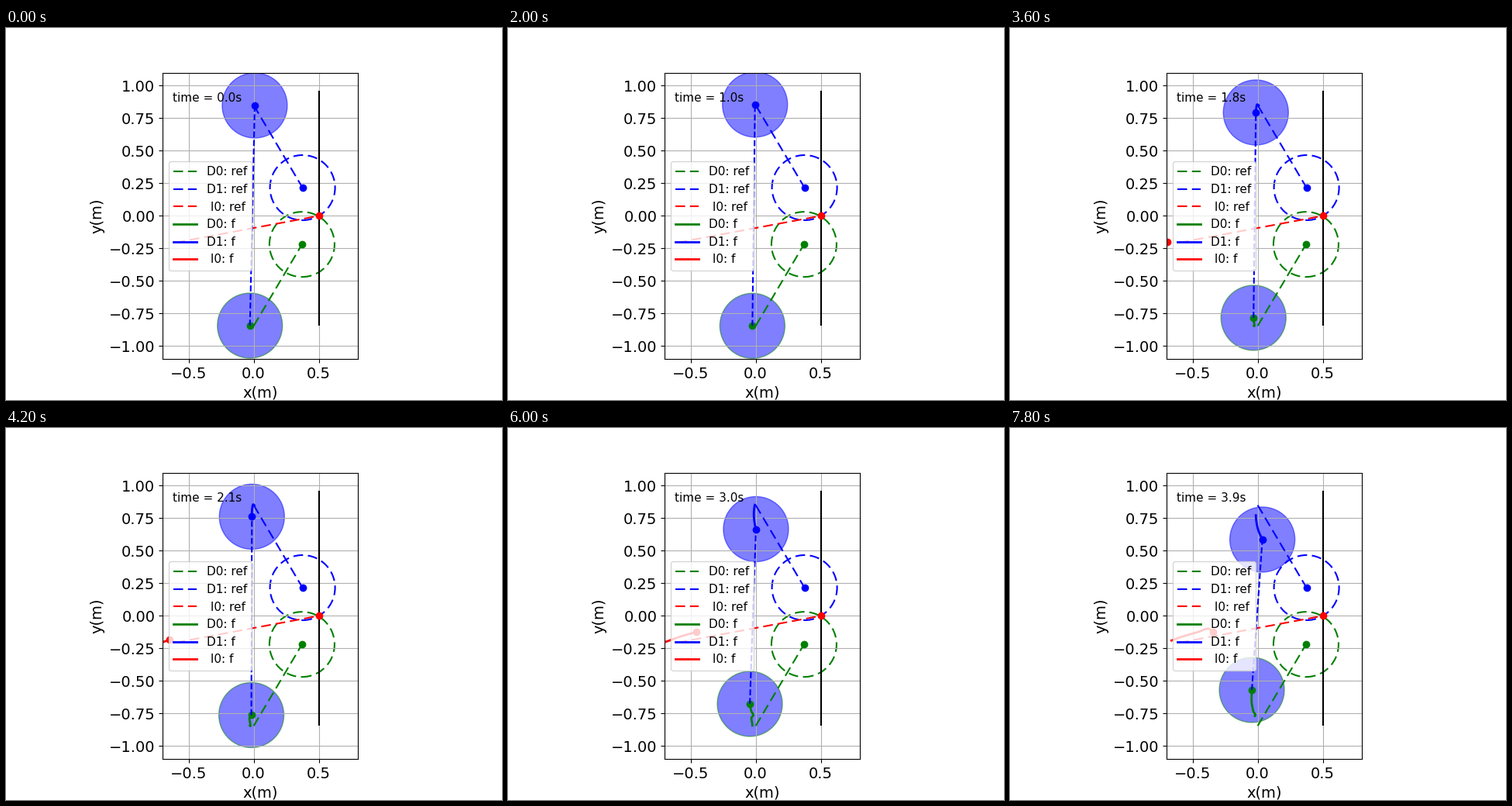
Animation, 640 px wide and 480 px high, one loop 8 s. Source, as a matplotlib script:

```python
import numpy as np
import matplotlib.pyplot as plt
from matplotlib.animation import FuncAnimation
from matplotlib.patches import Circle

FRAMES, STEP_MS, DT = 40, 200, 0.1
RADIUS = 0.25
TRAIL = 20  # points kept in each trail
DASH = (0, (6, 3))


def spline(times, values, t):
    """Cubic Hermite curve through a few key values."""
    times, values = np.array(times), np.array(values)
    slopes = np.gradient(values, times)
    k = np.clip(np.searchsorted(times, t, side="right") - 1, 0, len(times) - 2)
    h = times[k + 1] - times[k]
    u = (t - times[k]) / h
    return ((1 + 2 * u) * (1 - u) ** 2 * values[k] + u * (1 - u) ** 2 * h * slopes[k]
            + u ** 2 * (3 - 2 * u) * values[k + 1] - u ** 2 * (1 - u) * h * slopes[k + 1])


def path(*keys):
    """Positions in every frame from (time, x, y) keys."""
    t, x, y = zip(*keys)
    now = np.arange(FRAMES) * DT
    return np.column_stack([spline(t, x, now), spline(t, y, now)])


paths = [
    path((0, -.029, -.843), (1.4, -.027, -.825), (1.8, -.032, -.783),
         (2.1, -.018, -.762), (2.5, -.032, -.736), (3, -.045, -.676),
         (3.9, -.045, -.569)),
    path((0, .008, .848), (1.4, -.01, .836), (1.8, -.014, .794),
         (3, .002, .666), (3.9, .036, .586)),
    path((0, -.98, -.24), (1.8, -.694, -.2), (2.5, -.575, -.158),
         (3, -.456, -.123), (3.4, -.385, -.098), (3.9, -.343, -.123)),
]
colors = ["g", "b", "r"]
names = ["D0", "D1", " I0"]
starts = [(0, -.845), (0, .85), (-.6, -.205)]
goals = [(.371, -.219), (.375, .2165), (.5, 0)]

plt.rcParams.update({"font.family": "DejaVu Sans", "font.size": 14})
fig, ax = plt.subplots(figsize=(6.4, 4.8), dpi=100)
ax.set(xlim=(-.7, .8), ylim=(-1.1, 1.1), xlabel="x(m)", ylabel="y(m)")
ax.set_aspect("equal")
ax.set_yticks(np.arange(-1, 1.01, .25))
ax.grid()

ax.plot([.5, .5], [-.835, .955], "k", lw=1.5)
for name, color, start, goal in zip(names, colors, starts, goals):
    ax.plot(*zip(start, goal), color=color, ls=DASH, lw=1.5, label=f"{name}: ref")
    ax.plot(*goal, color + "o")
for color, goal in zip(colors[:2], goals):
    ax.add_patch(Circle(goal, RADIUS, fill=False, ec=color, ls=DASH, lw=1.5))

trails = [ax.plot([], [], color, lw=2, label=f"{name}: f")[0]
          for name, color in zip(names, colors)]
dots = [ax.plot([], [], color + "o")[0] for color in colors]
link, = ax.plot([], [], "b--", lw=1.5)
discs = [ax.add_patch(Circle((0, 0), RADIUS, fc="b", ec=color, alpha=.5))
         for color in colors[:2]]
clock = ax.text(.05, .9, "", transform=ax.transAxes, fontsize=11)
ax.legend(loc="center left", fontsize=11)


def update(i):
    for p, trail, dot in zip(paths, trails, dots):
        trail.set_data(*p[max(0, i - TRAIL + 1):i + 1].T)
        dot.set_data(*p[i:i + 1].T)
    for p, disc in zip(paths, discs):
        disc.center = p[i]
    link.set_data(*zip(paths[0][i], paths[1][i]))
    clock.set_text(f"time = {i * DT:.1f}s")
    return [*trails, *dots, *discs, link, clock]


anim = FuncAnimation(fig, update, frames=FRAMES, interval=STEP_MS, repeat=True,
                     repeat_delay=0, blit=False)
plt.show()
```
